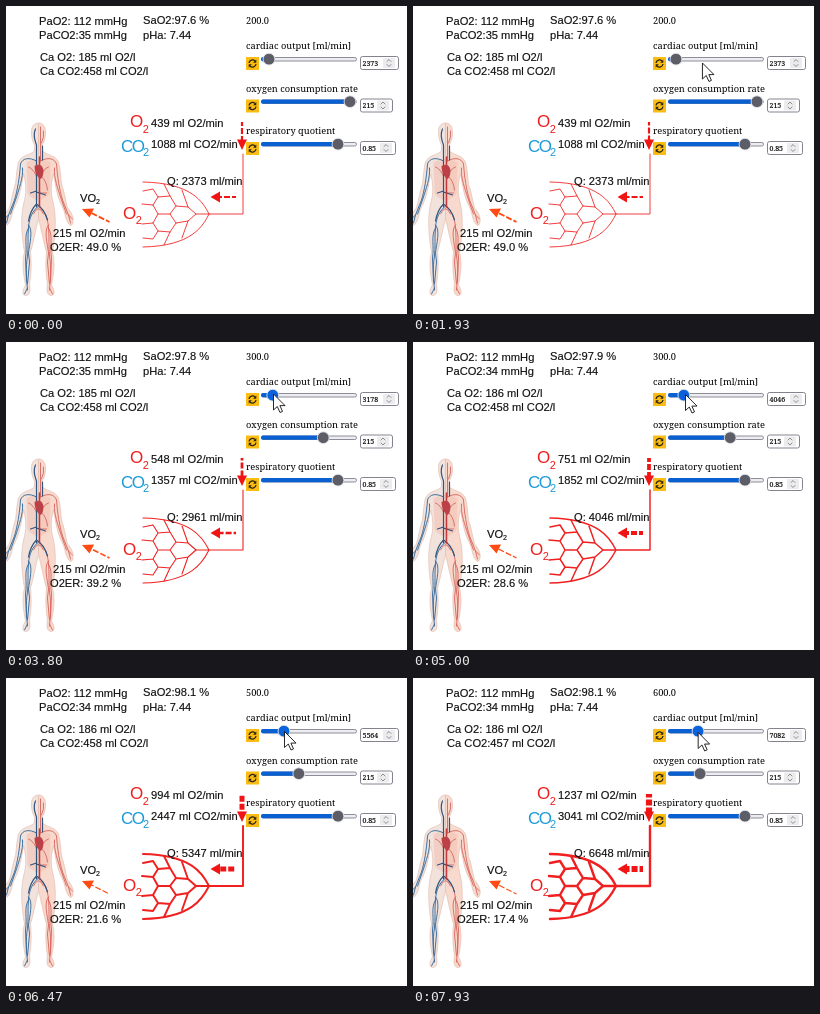
Write an HTML page that moves like this. It is 401 px wide and 308 px high and loops after 8 s.

```html
<!DOCTYPE html>
<html lang="en">
<head>
<meta charset="utf-8">
<title>Oxygen delivery</title>
<style>
  html, body { margin: 0; width: 100%; height: 100%; overflow: hidden; background: #fff; }
  svg { display: block; width: 401px; height: 308px; }
  .data { font: 11.15px "Liberation Sans", Arial, sans-serif; fill: #111; stroke: #111; stroke-width: .15; }
  .data .gas { font-size: 17px; stroke: none; }
  .data .sub { font-size: 11px; }
  .form { font: 9.25px "Noto Serif", serif; fill: #000; }
  .form .num { font-size: 7px; stroke: #000; stroke-width: .15; }
  .tip { font: 11.4px "Open Sans", sans-serif; fill: #111; }
  .red { fill: #f01d1d; }
  .blue { fill: #1c9bd8; }
  .line { fill: none; stroke-linecap: round; stroke-linejoin: round; }
</style>
</head>
<body>
<svg viewBox="0 0 401 308">
  <defs>
    <path id="half" d="M0 117C5 117 7.500 121 7 128C6.500 134 5 137 4 139V145C8 149 17 149 20 156C22 163 22 171 23 178C26 186 27 195 29 202C33 206 36 212 34 218C32 222 29 217 27 211C26 205 24 201 22 197C18 188 17 178 15 168C12 178 12 188 15 198C18 212 17 229 14 246C17 258 15 268 13 279C16 284 17 289 13 289.500C8 289.500 8 284 9 278C7 266 7 256 8 246C5 236 3 224 0 213Z"/>
    <g id="limbs" class="line">
      <path d="M2 155C9 151 16 152 18 158C19 172 21 184 24 194L30 209L32 217M16 162C15 172 20 184 22 191L28 208M30 209L34 213"/>
      <path d="M0 200C6 205 9 211 10 221C11 232 10 242 11 250C13 262 12 272 11 284M10 219C5 224 9 238 10 247L9 256L11 278M10 222C15 230 11 240 13 252L12 276M11 282L14 288"/>
    </g>
  </defs>

  <g transform="translate(32.500 0)">
    <g stroke="#dfb9aa" stroke-width=".6">
      <use href="#half" fill="#f8d9cd"/>
      <use href="#half" fill="#f2e2dc" transform="scale(-1 1)"/>
    </g>
    <path d="M-12 156Q0 150 12 156L11 188Q0 200 -11 188Z" fill="#f3c3b5" opacity=".6"/>
    <use href="#limbs" stroke="#d9625a" stroke-width=".9"/>
    <use href="#limbs" stroke="#40719f" stroke-width="1" transform="scale(-1 1)"/>
    <path class="line" d="M2 121V155M5 125Q6 131 3 137M-10 161Q-5 163 -2 170M10 161Q5 163 2 170Q8 174 9 184M0 187H8M-5 208Q0 197 5 208" stroke="#cf5a54" stroke-width=".8"/>
    <path class="line" d="M-3 123Q-6 129 -2 139V201M4 140V154M-2 185L-8 187M-2 186L7 189M-2 198Q-8 204 -10 215M-2 198Q6 203 9 214" stroke="#2d5580" stroke-width="1.200"/>
    <path class="line" d="M1 151V201" stroke="#c23a3a" stroke-width="1.500"/>
    <path d="M-4 160Q3 156 5 164Q5 171 2 173Q-4 169 -4 160Z" fill="#bd4046"/>
  </g>

  <g id="tree" class="line" stroke="#f02020">
    <path d="M237 148V208H190M203 208C197 196 186 177 137 176M203 208C197 220 186 240 137 241"/>
    <path d="M176 184L182 201L190 208L182 215L176 232M182 201L170 200L164 190L158 178M182 215L170 217L164 226L158 239M170 200L164 208L170 217M164 190L152 191L147 183L137 185M164 208H152L147 199L136 198M164 226L152 225L147 233L137 232M152 191L147 199M152 208L147 217L136 218M152 225L147 217"/>
  </g>
  <g id="arrows" fill="none">
    <path class="flow" d="M236 116V135" stroke="#f01414"/>
    <path class="flow" d="M230 191H212" stroke="#f01414"/>
    <path class="flow" d="M103.500 216L85 206.800" stroke="#ff4a12"/>
  </g>
  <path d="M231 133.500H241L236 144ZM214 185.500V196.500L204.500 191Z" fill="#f01414"/>
  <path d="M76 203L88 202.500L83.500 211.500Z" fill="#ff4a12"/>

  <g class="data">
    <text x="33" y="19">PaO2: 112 mmHg</text>
    <text x="33" y="33" id="pco2"></text>
    <text x="137" y="18" id="sat"></text>
    <text x="137" y="33">pHa: 7.44</text>
    <text x="34" y="55" id="cao2"></text>
    <text x="34" y="69" id="caco2"></text>
    <text x="145" y="121" id="o2"></text>
    <text x="145" y="142" id="co2"></text>
    <text x="161" y="179" id="q"></text>
    <text x="74" y="196">VO<tspan font-size="7" dy="2">2</tspan></text>
    <text x="47" y="231">215 ml O2/min</text>
    <text x="44" y="245" id="er"></text>
    <text class="gas red" x="124" y="121">O<tspan class="sub" dx="-.5" dy="6">2</tspan></text>
    <text class="gas blue" x="115" y="145.500" letter-spacing="-1.500">CO<tspan class="sub" dx="-.5" dy="4.500">2</tspan></text>
    <text class="gas red" x="117" y="213">O<tspan class="sub" dx="-.5" dy="5">2</tspan></text>
  </g>

  <g class="form" id="form"><text x="240" y="18" id="limit"></text></g>

  <g id="tip">
    <rect x="269" y="77" width="140" height="20" fill="#999" opacity=".5"/>
    <rect x="267.500" y="74.500" width="140" height="20" fill="#fff" stroke="#777"/>
    <text class="tip" x="274" y="89">cardiac output [ml/min]</text>
  </g>
  <path id="cursor" d="M0 0V16L3.800 12.500L6.500 18.500L9 17.400L6.400 11.600H11.500Z" fill="#fff" stroke="#111" stroke-width=".9"/>
</svg>

<script>
const $ = id => document.getElementById(id);
const put = (id, text) => { if ($(id).textContent !== text) $(id).textContent = text; };

// One labelled slider with reset button and number box
function addSlider(id, label, y, boxX, boxW) {
  const mid = y + 10, top = y + 8, spin = boxX + boxW - 16;
  $('form').insertAdjacentHTML('beforeend', `
    <text x="240" y="${y}">${label}</text>
    <rect x="240" y="${top}" width="13" height="13" fill="#fbbc14"/>
    <g transform="translate(246.5 ${top + 6.5})" fill="none" stroke="#2b2512" stroke-width="1.3">
      <path d="M-3.500 -.5A3.500 3.500 0 0 1 2.500 -2.500M3.500 .5A3.500 3.500 0 0 1 -2.500 2.500"/>
      <path d="M3.800 -4V-.7H.6ZM-3.800 4V.7H-.6Z" fill="#2b2512" stroke="none"/>
    </g>
    <rect x="255.500" y="${mid - 1.5}" width="95" height="3.500" rx="1.700" fill="#ececf1" stroke="#83838f" stroke-width=".9"/>
    <rect id="${id}Fill" x="255" y="${mid - 2}" height="4.300" rx="2" fill="#0a60d0"/>
    <circle id="${id}Thumb" cy="${mid + .2}" r="5.900" stroke="#e4e4ea" stroke-width=".9"/>
    <rect x="${boxX + .5}" y="${top - .5}" width="${boxW - 1}" height="13" rx="2" fill="#fff" stroke="#83838f"/>
    <text class="num" id="${id}Num" x="${boxX + 2.5}" y="${top + 8.6}"></text>
    <rect x="${spin}" y="${top + 1}" width="12" height="10" rx="1" fill="#ececef"/>
    <path class="line" d="M${spin + 4} ${top + 4.5}l2 -2l2 2m-4 3l2 2l2 -2" stroke="#777" stroke-width=".8"/>`);
}

function setSlider(id, x, value, color) {
  $(id + 'Fill').setAttribute('width', x - 255);
  $(id + 'Thumb').setAttribute('cx', x);
  $(id + 'Thumb').setAttribute('fill', color);
  put(id + 'Num', value);
}

addSlider('heart', 'cardiac output [ml/min]', 43, 354, 39);
addSlider('oxygen', 'oxygen consumption rate', 85.5, 354, 33);
addSlider('quotient', 'respiratory quotient', 128, 354, 36);

// Moments at which the drag reaches the next slider step
const steps = [3250, 3600, 3720, 4050, 4300, 4500, 4800, 5350, 5550, 5750, 5950,
  6200, 6300, 6420, 6700, 7100, 7400, 7680, 7740, 7830, 7900];

function output(t) {
  const n = steps.filter(s => s <= t).length;
  return n ? Math.round(3178 + 216.9 * (n - 3)) : 2373;
}

const track = [[930, 402, 112], [1350, 330, 76], [1700, 291, 59], [1930, 289.5, 57], [2250, 271, 52],
  [2500, 267, 51], [3250, 266.5, 51], [3800, 267.5, 52], [5000, 272.5, 52.5], [6470, 278.5, 53.5], [8000, 285.5, 54.5]];

function cursorAt(t) {
  const i = track.findIndex(k => k[0] > t);
  if (i < 1) return [-50, -50];
  const [a, b] = [track[i - 1], track[i]], p = (t - a[0]) / (b[0] - a[0]);
  return [a[1] + (b[1] - a[1]) * p, a[2] + (b[2] - a[2]) * p];
}

const GREY = '#5d5d68', DRAG = '#0a62dc', USE = 215, LAG = 120;

function draw(now) {
  const t = now % 8000;
  const set = output(t), q = output(t - LAG);
  const o2 = .18667 * q - 4.3, co2 = .45698 * q + 3.39;
  const limit = Math.floor(set * .096 / 100) * 100;

  put('pco2', `PaCO2:${q < 3300 ? 35 : 34} mmHg`);
  put('sat', `SaO2:${(98.41 - 1900 / q).toFixed(1)} %`);
  put('cao2', `Ca O2: ${Math.round(o2 / q * 1000)} ml O2/l`);
  put('caco2', `Ca CO2:${Math.round(co2 / q * 1000)} ml CO2/l`);
  put('o2', `${Math.round(o2)} ml O2/min`);
  put('co2', `${Math.round(co2)} ml CO2/min`);
  put('q', `Q: ${q} ml/min`);
  put('er', `O2ER: ${(USE / o2 * 100).toFixed(1)} %`);
  put('limit', limit.toFixed(1));

  setSlider('heart', 263 + (set - 2373) * .00468, set, t >= 3200 ? DRAG : GREY);
  setSlider('oxygen', 260.5 + 83.5 * Math.min(1, (USE - 35) / (limit - 35)), USE, GREY);
  setSlider('quotient', 332, '0.85', GREY);

  const w = q / 2373;
  $('tree').setAttribute('stroke-width', .86 * w);
  document.querySelectorAll('.flow').forEach((arrow, i) => {
    arrow.setAttribute('stroke-width', i < 2 ? 2.2 * w : .6 + 1.3 / w);
    arrow.setAttribute('stroke-dasharray', '6 2');
    arrow.setAttribute('stroke-dashoffset', 2 - t * .008);
  });

  $('tip').setAttribute('visibility', t >= 2800 && t < 3230 ? 'visible' : 'hidden');
  $('cursor').setAttribute('transform', `translate(${cursorAt(t)})`);
  requestAnimationFrame(draw);
}
draw(performance.now());
</script>
</body>
</html>
```
